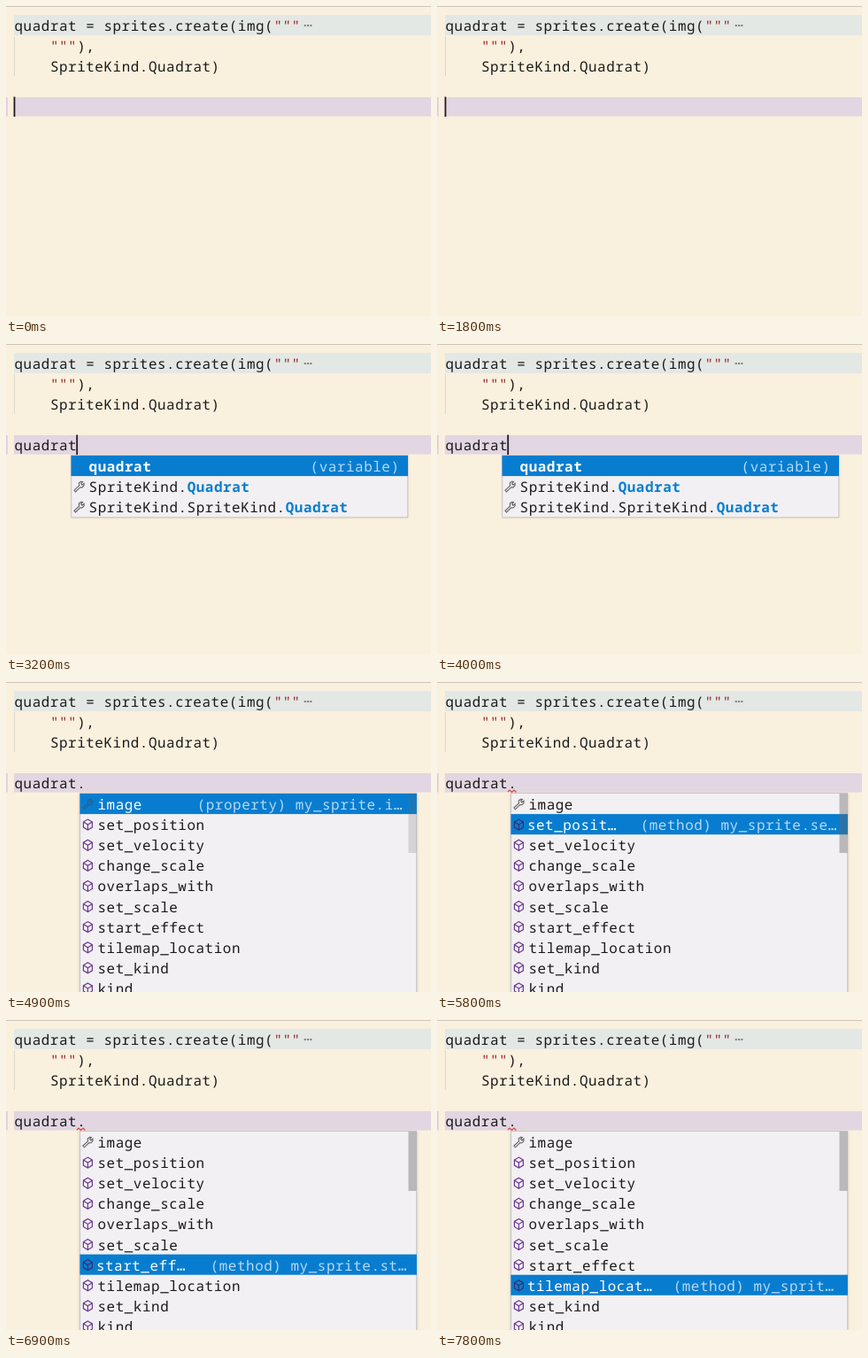
Recreate the animation shown at these times as an HTML page with a canvas. Size 480 by 350 pixels, loop 8 s.

```html
<!DOCTYPE html>
<html lang="en">
<head>
<meta charset="utf-8">
<title>Code completion</title>
<style>
html, body { margin: 0; width: 100%; height: 100%; overflow: hidden; background: #faf0de; }
canvas { display: block; width: 480px; height: 350px; }
</style>
</head>
<body>
<canvas id="stage"></canvas>
<script>
const LOOP = 8000, CELL = 10.1, LINE = 23.1, LEFT = 9.2, SIZE = 15.9;
const INK = '#1c1b1b', BLUE = '#087dd0', RED = '#992326', PURPLE = '#6b3791', PALE = '#b5d9f2';
const FAMILY = '"Noto Sans Mono", "DejaVu Sans Mono", monospace';

const canvas = document.getElementById('stage');
const ctx = canvas.getContext('2d');
const dpr = window.devicePixelRatio || 1;
canvas.width = 480 * dpr;
canvas.height = 350 * dpr;
ctx.textRendering = 'geometricPrecision';

// letter spacing that fills one cell per character
ctx.font = `100px ${FAMILY}`;
const gap = CELL - ctx.measureText('0').width * SIZE / 100;
ctx.letterSpacing = `${gap}px`;

// when each character of "quadrat." is typed, and when the selection moves down
const keys = [2100, 2300, 2500, 2800, 2870, 2940, 3000, 4200];
const moves = [5800, 6000, 6200, 6400, 6600, 6800, 7100];
const WORD = 'quadrat.';

const members = ['image', 'set_position', 'set_velocity', 'change_scale', 'overlaps_with',
  'set_scale', 'start_effect', 'tilemap_location', 'set_kind', 'kind'];
// label and detail of a row while it is selected
const chosen = [
  ['image', '(property) my_sprite.i…', 132],
  ['set_posit…', '(method) my_sprite.se…', 146],
  ['set_veloc…', '(method) my_sprite.se…', 146],
  ['change_sc…', '(method) my_sprite.ch…', 145],
  ['overlaps_…', '(method) my_sprite.ov…', 146],
  ['set_scale', '(method) my_sprite.se…', 146],
  ['start_eff…', '(method) my_sprite.st…', 147],
  ['tilemap_locat…', '(method) my_sprit…', 183]
];

const passed = (times, t) => times.filter(k => t >= k).length;

function rect(x, y, w, h, color) {
  ctx.fillStyle = color;
  ctx.fillRect(x, y, w, h);
}

function dots(x, y, color) {
  for (let i = 0; i < 3; i++) rect(x + 0.8 + i * 3.3, y, 2.1, 2.1, color);
}

// draws a string and returns the x where it ends
function text(s, x, y, color = INK, weight = 400) {
  ctx.font = `${weight} ${SIZE}px ${FAMILY}`;
  ctx.fillStyle = color;
  const body = s.replace('…', '');
  ctx.fillText(body, x + gap / 2, y);
  if (body !== s) dots(x + body.length * CELL, y - 2, color);
  return x + s.length * CELL;
}

function path(points, color, width = 1.2, close = false) {
  ctx.beginPath();
  points.forEach(([x, y]) => ctx.lineTo(x, y));
  if (close) ctx.closePath();
  ctx.strokeStyle = color;
  ctx.lineWidth = width;
  ctx.stroke();
}

function cube(x, y, color) {
  path([[x, y - 6], [x + 5, y - 3], [x + 5, y + 3], [x, y + 6], [x - 5, y + 3], [x - 5, y - 3]], color, 1.2, true);
  path([[x - 5, y - 3], [x, y], [x + 5, y - 3]], color);
  path([[x, y], [x, y + 6]], color);
}

function wrench(x, y, color) {
  path([[x - 5.5, y + 4], [x + 0.2, y - 1.2], [x - 0.2, y - 4], [x + 2, y - 5.8], [x + 4, y - 5.6],
    [x + 2.2, y - 3.4], [x + 3.4, y - 2], [x + 5.6, y - 3.8], [x + 5.6, y - 1.4], [x + 3.6, y + 0.8],
    [x + 1.4, y + 0.6], [x - 4, y + 5.8]], color, 1.1, true);
}

function enumIcon(x, y) {
  const c = '#c08155';
  ctx.strokeStyle = c;
  ctx.lineWidth = 1.2;
  ctx.strokeRect(x - 1, y - 4.5, 6.5, 5.5);
  ctx.strokeRect(x - 5.5, y - 1, 6.5, 5.5);
  rect(x + 1, y - 2.5, 3, 1.2, c);
  rect(x - 4, y + 1.2, 3.5, 1.2, c);
}

function editor() {
  rect(0, 0, 480, 350, '#faf0de');
  rect(0, 0, 480, 1, '#cbc5b8');
  rect(9, 10, 471, 23, '#e3e8e5');
  rect(9, 34, 1, 45, '#dcd7ca');
  rect(0, 103, 2, 21.5, '#e0d2df');
  rect(9, 103, 471, 21.5, '#e2d6e2');
  let x = text('quadrat = sprites.create(img(', LEFT, 28);
  x = text('"""', x, 28, RED);
  dots(x + 3.5, 21, '#808482');
  x = text('"""', LEFT + 4 * CELL, 51, RED);
  text('),', x, 51);
  text('SpriteKind.Quadrat)', LEFT + 4 * CELL, 74);
}

function panel(x, rows, selected) {
  const h = rows * LINE + 1;
  ctx.save();
  ctx.shadowColor = 'rgba(0,0,0,.18)';
  ctx.shadowBlur = 3 * dpr;
  rect(x, 125.5, 380.5, h, '#f2f0f2');
  ctx.restore();
  ctx.strokeStyle = '#c6c4c7';
  ctx.lineWidth = 1;
  ctx.strokeRect(x + 0.25, 125.5, 380, h);
  rect(x, 126 + selected * LINE, 380.5, LINE, BLUE);
}

// completions of the typed word, matching part in bold
function wordList(typed) {
  const x = LEFT + typed.length * CELL - 6.4;
  const items = ['quadrat', 'SpriteKind.Quadrat', 'BeatFraction.QUARTER', 'SpriteKind.SpriteKind.Quadrat']
    .filter(s => s.toLowerCase().includes(typed));
  panel(x, items.length, 0);
  items.forEach((s, i) => {
    const y = 144 + i * LINE, at = s.toLowerCase().indexOf(typed), end = at + typed.length;
    const color = i ? INK : '#fff';
    let tx = text(s.slice(0, at), x + 19.8, y, color);
    tx = text(s.slice(at, end), tx, y, i ? BLUE : '#fff', 700);
    text(s.slice(end), tx, y, color);
    if (!i) text('(variable)', x + 269.8, y, PALE);
    else if (s.startsWith('Beat')) enumIcon(x + 9, y - 6);
    else wrench(x + 9, y - 6, '#626064');
  });
}

function memberList(selected, fade) {
  const x = 83.4;
  panel(x, 12, selected);
  members.forEach((s, i) => {
    const y = 144 + i * LINE, on = i === selected;
    if (i) cube(x + 9, y - 6, on ? '#353071' : PURPLE);
    else wrench(x + 9, y - 6, on ? '#28608f' : '#626064');
    if (on) {
      const [label, detail, dx] = chosen[i];
      text(label, x + (i ? 18.2 : 19.8), y, '#fff');
      text(detail, x + dx, y, PALE);
    } else text(s, x + 19.8, y);
  });
  rect(454.5, 126, 9, 67, `rgba(100,100,100,${0.4 * fade})`);
}

function cursorOn(t) {
  const last = keys.filter(k => t >= k).pop() ?? -200;
  return Math.floor((t - last) / 500) % 2 === 0;
}

function draw(t) {
  ctx.setTransform(dpr, 0, 0, dpr, 0, 0);
  editor();
  const typed = WORD.slice(0, passed(keys, t));
  text(typed, LEFT, 120);
  if (t >= 5200) path([[80, 124], [82, 122], [84.5, 124.5], [87, 122], [89.5, 124.5]], '#e0443e', 1.2);
  if (t >= 4900) memberList(passed(moves, t), Math.min(1, (t - 4800) / 200));
  else if (t >= 2700 && t < 4200) wordList(typed);
  if (cursorOn(t)) rect(LEFT + typed.length * CELL - 0.6, 102.5, 1.8, 22.5, '#211a20');
}

const start = performance.now();
function frame() {
  draw((performance.now() - start) % LOOP);
  requestAnimationFrame(frame);
}
frame();
</script>
</body>
</html>
```
